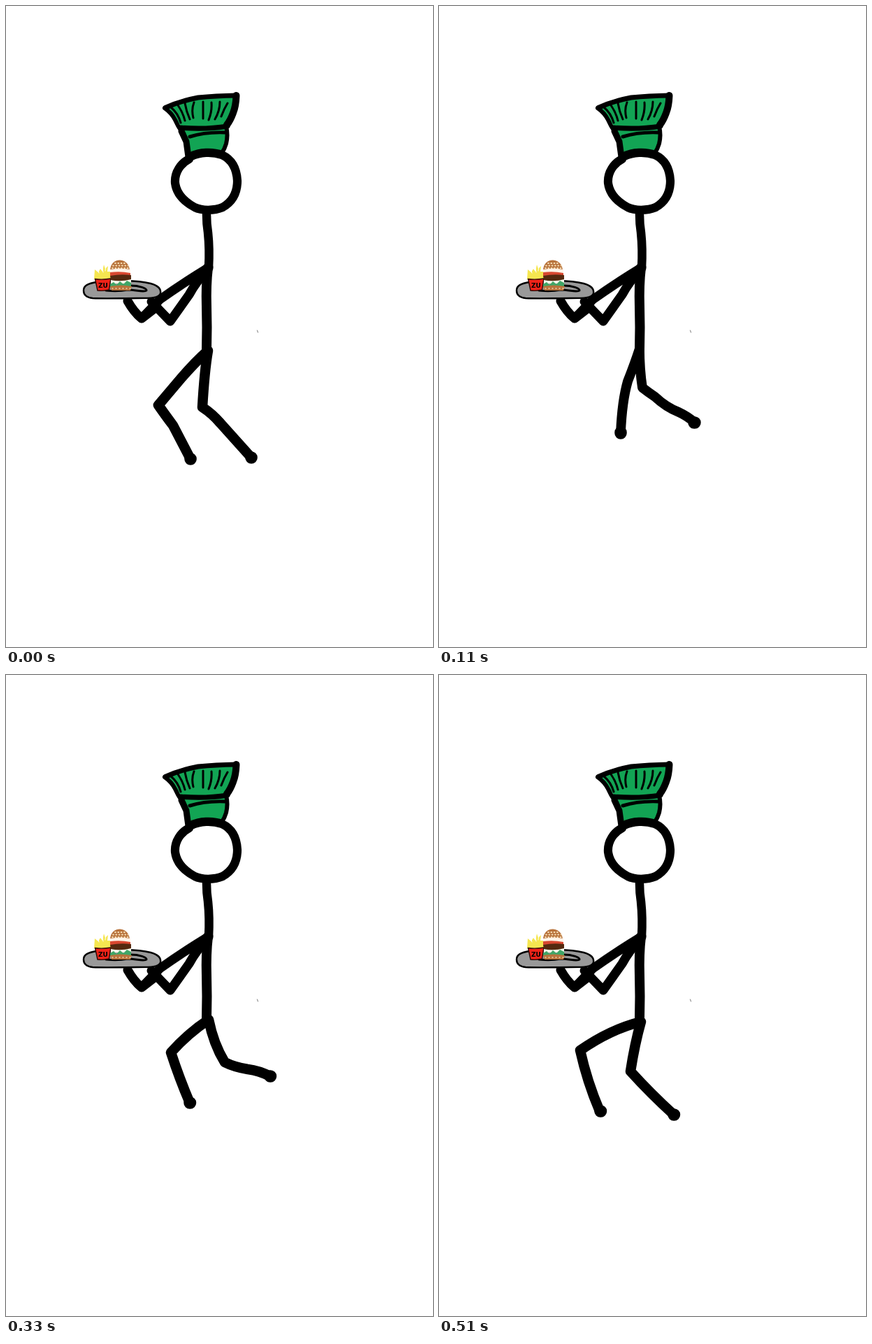
Recreate the animation shown at these times as an HTML page. Size 611x917 px, loop 0.55 s.

```html
<!DOCTYPE html>
<html lang="en">
<head>
<meta charset="utf-8">
<title>Waiter walk cycle</title>
<style>
  html, body { margin: 0; width: 100%; height: 100%; overflow: hidden; background: #fff; }
  svg { display: block; width: 611px; height: 917px; }
  path { stroke-linecap: round; stroke-linejoin: round; }
  .line { fill: none; stroke: #000; }
  .step { opacity: 0; animation: show 550ms step-end infinite; animation-delay: calc(var(--i) * 110ms - 550ms); }
  .step path { fill: none; stroke: #000; stroke-width: 14.5; }
  .step .feet { stroke-width: 17.5; }
  @keyframes show {
    0% { opacity: 1; }
    20%, 100% { opacity: 0; }
  }
</style>
</head>
<body>
<svg viewBox="0 0 611 917">
  <!-- hat -->
  <g>
    <path fill="#12a454" d="M228 146Q272 129 331 128Q329 151 317 171Q319 191 309 209Q285 203 264 214L255 181Q246 161 228 146Z"/>
    <path class="line" stroke-width="6" d="M227 146Q237 153 242 163Q246 172 251 179"/>
    <path class="line" stroke-width="7" d="M228 145.5Q249 136 275 131Q300 128.5 329 128"/>
    <path class="line" stroke-width="10" d="M329.5 128Q329 143 325 153Q321 164 316 170"/>
    <path class="line" stroke-width="6" d="M315 172Q318 185 315 197Q313 204 309 210"/>
    <path class="line" stroke-width="9" d="M251 179L258 194L261 216"/>
    <path class="line" stroke-width="7" d="M249 174Q285 177 317 172"/>
    <path class="line" stroke-width="5" d="M263 187Q285 180 313 181"/>
    <path class="line" stroke-width="3" d="M236 145Q246 153 250 167M246 142Q253 152 256 164M256 139Q258 151 263 162M269 138Q265 148 268 160M282 137V161M294 138Q295 151 290 163M306 137Q306 150 299 162M317 139Q312 147 308 158"/>
    <path class="line" style="stroke:#7a1a10" stroke-width="1" d="M266 208V217"/>
  </g>

  <!-- head, spine, arms -->
  <path class="line" stroke-width="12.2" d="M262 219C250 225 241 238 242 253C244 270 257 281 270 288C280 293 298 293 310 288C324 280 331 267 331 250C330 231 322 219 309 213C295 208 277 209 265 215"/>
  <path class="line" stroke-width="12.5" d="M287 298Q287 312 289 324Q291.5 348 290 374"/>
  <path class="line" stroke-width="14" d="M289 374Q286 400 287 430Q288 460 287 491"/>
  <path class="line" stroke-width="13" d="M290 374Q254 396 220 420L194 447Q183 438 174 422M290 375Q273 393 262 413L235 451L208 423M194 447L216 430"/>

  <!-- tray -->
  <path fill="#999" stroke="#000" stroke-width="2.4" d="M111 407C111 400 117 397 130 395C155 392 188 392 207 397C218 400 222 405 221 411C219 418 207 418 188 418C164 418 143 419 124 418C115 417 111 413 111 407Z"/>
  <path class="line" stroke-width="3" d="M178 400C191 400 202 404 201 407C198 410 186 406 174 406Q160 409 143 407"/>

  <!-- fries -->
  <path fill="#f5e650" d="M126 391L127 377L132 381L135 376L138 380L140 370L142 376L146 372L145 380L150 380V391Z"/>
  <path fill="none" stroke="#fff" stroke-width="1" d="M131 376L133 382M138 374L139 381M143 371L142 379"/>
  <path fill="#ee2218" stroke="#2a0805" stroke-width="1.4" d="M127.5 390.5Q138 392 150 390L147.5 406Q139 408 131 407Z"/>
  <text x="139" y="403" text-anchor="middle" font-family="'DejaVu Sans', sans-serif" font-size="9" font-weight="bold">ZU</text>

  <!-- burger -->
  <path fill="#b8733c" d="M149 379C149 369 155 363.5 163 363.5C172 364 177 371 177 379Z"/>
  <path fill="none" stroke="#f4dcb4" stroke-width="1.8" stroke-dasharray="1 3.3" d="M152 375H176M153 371.5H175M156 368H171"/>
  <path fill="#fff4e8" d="M149 377Q163 374 178 377V383H149Z"/>
  <path fill="#d84830" d="M149 381Q164 379 178 382V386H149Z"/>
  <path fill="#54290f" d="M149 386Q164 383 179 385V392Q164 395 150 392Z"/>
  <path fill="#f4f7e8" d="M150 392Q164 395 179 391V397H150Z"/>
  <path fill="#3fa667" d="M149 398L154 395L158 399L163 394L168 398L173 393L179 396V402H149Z"/>
  <path fill="#b8733c" d="M149 401Q164 398 180 401L178 407H151Z"/>
  <path fill="none" stroke="#f4dcb4" stroke-width="1.4" stroke-dasharray="1 4" d="M152 404H178"/>

  <path fill="none" stroke="#777" stroke-width="1" d="M359.5 464L360.5 467"/>

  <!-- legs -->
  <g class="step" style="--i:0">
    <path d="M289 493Q271 509 251 532L218 571Q227 584 239 600L264 648M289 493Q284 522 281 574Q295 583 307 597L351 646"/>
    <path class="feet" d="M264 648h.1M351 646h.1"/>
  </g>
  <g class="step" style="--i:1">
    <path style="stroke-width:13.8" d="M287 490Q281 509 270 537Q262 565 260 610M287 490Q287 520 291 546Q300 553 309 559Q325 574 343 581Q356 587 366 596"/>
    <path class="feet" d="M260 610v1M365 596h1"/>
  </g>
  <g class="step" style="--i:2">
    <path style="stroke-width:14" d="M287 490Q284 523 276 555Q289 574 298 595L314 630M287 490Q302 516 322 537Q360 533 398 519"/>
    <path class="feet" d="M314 630v2M397 519h1"/>
  </g>
  <g class="step" style="--i:3">
    <path d="M290 493Q260 513 236 540Q248 577 263 612M290 493Q297 528 313 554Q327 561 346 564Q362 566 378 574"/>
    <path class="feet" d="M263 612h.5M378 574h.5"/>
  </g>
  <g class="step" style="--i:4">
    <path d="M289 496Q245 507 202 537Q212 582 230 624M289 496Q280 528 274 567Q303 599 336 629"/>
    <path class="feet" d="M231 624h.5M336 629h.5"/>
  </g>
</svg>
</body>
</html>
```
